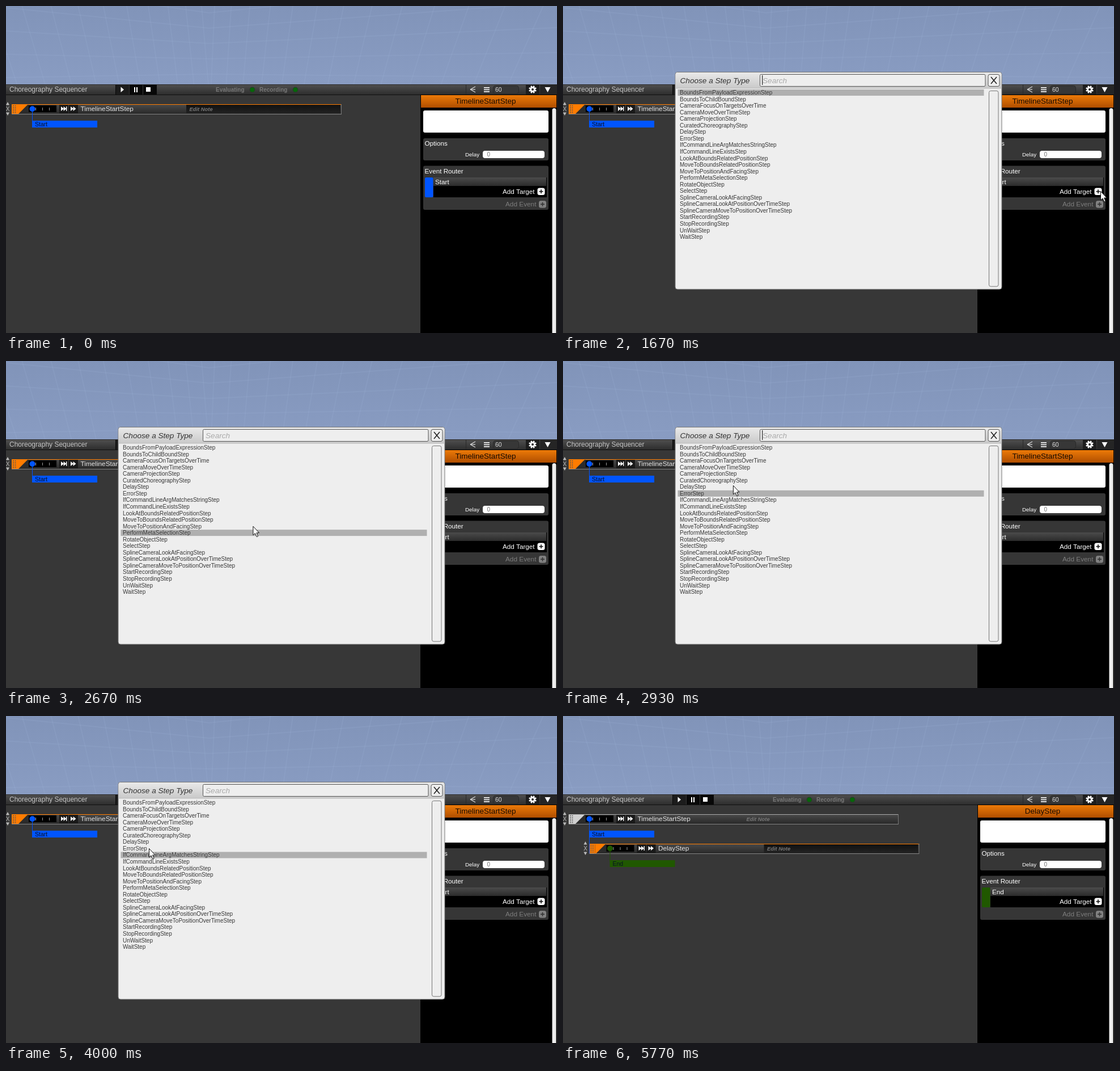
An HTML page with a canvas that plays this animation: 972x576 px, repeating every 7.46 s.

```html
<!DOCTYPE html>
<html lang="en">
<head>
<meta charset="utf-8">
<title>Choreography Sequencer</title>
<style>
html, body { margin: 0; width: 100%; height: 100%; overflow: hidden; background: #000; }
canvas { display: block; }
</style>
</head>
<body>
<canvas id="stage" width="972" height="576"></canvas>
<script>
const ctx = document.getElementById('stage').getContext('2d');
const LOOP = 7460, OPEN = 1670, CLOSE = 4470, BLINK = 295;
const ROW_TOP = 147, ROW_H = 11.55;
const ORANGE = '#ff7c00', BLUE = '#0055ff', GREEN = '#205800';

const steps = `BoundsFromPayloadExpressionStep BoundsToChildBoundStep CameraFocusOnTargetsOverTime
CameraMoveOverTimeStep CameraProjectionStep CuratedChoreographyStep DelayStep ErrorStep
IfCommandLineArgMatchesStringStep IfCommandLineExistsStep LookAtBoundsRelatedPositionStep
MoveToBoundsRelatedPositionStep MoveToPositionAndFacingStep PerformMetaSelectionStep
RotateObjectStep SelectStep SplineCameraLookAtFacingStep SplineCameraLookAtPositionOverTimeStep
SplineCameraMoveToPositionOverTimeStep StartRecordingStep StopRecordingStep UnWaitStep WaitStep`.split(/\s+/);

// Pointer path: time, x, y
const path = [
  [500, 801, 548], [700, 868, 440], [900, 926, 360], [1170, 948, 326],
  [2200, 948, 326], [2330, 850, 335], [2480, 650, 328], [2630, 477, 302], [2670, 436, 291],
  [2890, 311, 229], [2930, 300, 219], [3100, 284, 211], [3350, 268, 222], [3600, 258, 236],
  [3730, 258, 236], [3800, 256, 238], [3960, 256, 238], [4000, 252, 233], [4330, 256, 221],
  [5270, 256, 221], [5420, 238, 285], [5600, 262, 430], [5770, 301, 577]
];

function pointer(t) {
  const i = path.findIndex(p => p[0] > t);
  if (i < 1) return null;
  const [t0, x0, y0] = path[i - 1], [t1, x1, y1] = path[i];
  const k = (t - t0) / (t1 - t0);
  return { x: x0 + (x1 - x0) * k, y: y0 + (y1 - y0) * k };
}

function rect(x, y, w, h, fill) {
  ctx.fillStyle = fill;
  ctx.fillRect(x, y, w, h);
}
function round(x, y, w, h, r, fill, stroke) {
  ctx.beginPath();
  ctx.roundRect(x, y, w, h, r);
  ctx.fillStyle = fill;
  ctx.fill();
  if (stroke) { ctx.strokeStyle = stroke; ctx.lineWidth = 1; ctx.stroke(); }
}
function shade(y, h, top, bottom) {
  const g = ctx.createLinearGradient(0, y, 0, y + h);
  g.addColorStop(0, top);
  g.addColorStop(1, bottom);
  return g;
}
function text(s, x, y, size, fill, style = '', align = 'left') {
  ctx.font = `${style} ${size}px "Liberation Sans", Arial, sans-serif`;
  ctx.textAlign = align;
  ctx.fillStyle = fill;
  ctx.fillText(s, x, y);
}
function poly(fill, ...pts) {
  ctx.beginPath();
  for (let i = 0; i < pts.length; i += 2) ctx.lineTo(pts[i], pts[i + 1]);
  ctx.closePath();
  ctx.fillStyle = fill;
  ctx.fill();
}
function line(x0, y0, x1, y1, stroke, width = 1) {
  ctx.beginPath();
  ctx.moveTo(x0, y0);
  ctx.lineTo(x1, y1);
  ctx.strokeStyle = stroke;
  ctx.lineWidth = width;
  ctx.stroke();
}
function dot(x, y, r, fill) {
  ctx.beginPath();
  ctx.arc(x, y, r, 0, 7);
  ctx.fillStyle = fill;
  ctx.fill();
}

function sky() {
  rect(0, 0, 972, 138, shade(0, 138, '#8194b9', '#899cc2'));
  const light = 'rgba(165,182,215,.14)';
  for (let i = 0; i < 13; i++) {
    const d = 24 * i + i * i * 1.5;
    line(345 - d * 1.1, 0, 357 - d, 138, light, 2);
    line(368 + d * 1.15, 0, 362 + d * 1.04, 138, light, 2);
  }
  for (let i = 0; i < 6; i++) {
    const y = 12 + i * 27;
    line(358, y, 0, y - 50 + i * 14, light, 2);
    line(358, y, 972, y - 62 + i * 17, light, 2);
  }
}

function toolbar() {
  rect(0, 138, 972, 18, shade(138, 18, '#505050', '#2e2e2e'));
  rect(0, 138, 972, 1, '#282828');
  rect(0, 156, 972, 1, '#111');
  text('Choreography Sequencer', 6, 151, 12, '#c4c4c4');
  rect(193, 139, 73, 17, '#080808');
  rect(194, 139, 23, 17, '#1c1c1c');
  rect(217, 139, 1, 17, '#383838');
  rect(241, 139, 1, 17, '#383838');
  poly('#fff', 202.5, 142.5, 208, 147.2, 202.5, 152);
  rect(226, 143, 2, 9, '#fff');
  rect(230, 143, 2, 9, '#fff');
  rect(247, 143, 8, 8, '#fff');
  text('Evaluating', 370, 151, 10, '#787878', 'bold');
  text('Recording', 447, 151, 10, '#787878', 'bold');
  for (const x of [434.5, 510.5]) {
    dot(x, 147.5, 5, '#303530');
    dot(x, 147.5, 4, '#07660a');
  }
  for (const dy of [-5, 0, 5]) line(819, 147, 828, 147 + dy, '#ddd', 1.2);
  for (const y of [143, 146.5, 150]) rect(843, y, 10, 1.8, '#eee');
  rect(811, 139, 1, 17, '#292929');
  round(859.5, 140.5, 45, 14, 4, '#373737', '#292929');
  text('60', 863, 151, 10.5, '#ddd');
  rect(917, 139, 24, 17, '#1d1d1d');
  rect(942, 139, 30, 17, '#252525');
  for (let i = 0; i < 4; i++) {
    const a = i * Math.PI / 4 + .39, c = Math.cos(a) * 6.8, s = Math.sin(a) * 6.8;
    line(929 - c, 147 - s, 929 + c, 147 + s, '#fff', 2.6);
  }
  dot(929, 147, 5, '#fff');
  dot(929, 147, 2, '#222');
  poly('#fff', 950.5, 143, 960.5, 143, 955.5, 152);
}

function timelineRow(dx, dy, name, event, color, selected) {
  ctx.save();
  ctx.translate(dx, dy);
  poly('#bbb', 0, 174.5, 3, 169, 6, 174.5);
  poly('#bbb', 0, 187.5, 3, 193, 6, 187.5);
  text('X', 3, 185, 10, '#bbb', '', 'center');
  const accent = selected ? ORANGE : '#d0d0d0';
  rect(10, 173, 582, 17, shade(173, 17, '#4a4a4a', '#292929'));
  rect(10, 173, 10, 17, accent);
  for (let y = 175; y < 188; y += 3) {
    rect(12, y, 2, 1.3, '#555');
    rect(15.5, y, 2, 1.3, '#555');
  }
  rect(20, 173, 20, 17, '#2b2b2b');
  poly(accent, 20, 173, 39, 173, 22, 190, 20, 190);
  rect(40, 175, 49, 12, '#000');
  for (const x of [52, 64, 76]) rect(x, 179, 1, 5, '#999');
  rect(94, 174, 16, 15, '#191919');
  rect(111, 174, 16, 15, '#191919');
  for (const x of [97, 101.5, 114, 118.5]) poly('#fff', x, 177, x + 5, 181, x, 185);
  rect(106, 177, 1.4, 8, '#fff');
  text(name, 131.5, 185, 11.8, '#e5e5e5');
  if (selected) rect(318, 174, 272, 15, shade(174, 15, '#111', '#222'));
  text('Edit Note', 323.5, 184.5, 9.4, '#777', 'italic bold');
  rect(10, 173, 582, 1, selected ? ORANGE : '#aaa');
  rect(10, 190, 582, 1, '#858585');
  rect(591, 173, 1, 17, '#777');
  rect(46, 181, 1, 23, color);
  dot(46.5, 181.3, 5, color);
  rect(46, 202, 115, 12, color);
  text(event, 51, 212, 10.5, '#071026');
  ctx.restore();
}

function plus(x, y, fill, mark) {
  round(x, y - 6, 13, 12.5, 3.5, fill);
  rect(x + 3, y - .6, 7, 1.6, mark);
  rect(x + 5.7, y - 3.3, 1.6, 7, mark);
}

function inspector(name, event, color, pressed) {
  rect(731, 156, 241, 420, '#000');
  rect(732, 157, 239, 22, shade(157, 22, '#ec7a08', '#b04e00'));
  text(name, 846, 172, 13.5, '#170a00', '', 'center');
  round(963.5, 180, 7, 400, 3.5, '#eee');
  round(736, 184, 221, 39, 3, '#fff');
  round(736, 233, 221, 39, 3, '#363636');
  text('Options', 738.5, 246, 11.7, '#fff');
  text('Delay', 810, 265, 9.8, '#fff');
  round(841, 255, 109, 13, 4, '#fff');
  text('0', 848.5, 265, 10, '#777');
  round(736, 281.5, 221, 77.5, 3, '#363636');
  text('Event Router', 738.5, 295, 11.7, '#fff');
  rect(754, 302, 200, 35, '#000');
  rect(754, 302, 199, 15, shade(302, 15, '#4b4b4b', '#2b2b2b'));
  round(739, 302, 14.5, 35, 2, color);
  text(event, 757, 313.5, 11.7, '#fff');
  text('Add Target', 876, 330.5, 11.7, '#fff');
  plus(937.5, 326.5, pressed ? '#bbb' : '#fff', '#111');
  text('Add Event', 881, 353, 11.8, '#7d7d7d');
  plus(940, 349, '#818181', '#333');
}

function hoverRow(t) {
  const p = pointer(t - 40); // the highlight trails the pointer slightly
  if (!p || p.x > 743) return 0;
  return Math.floor((p.y + 4 - ROW_TOP) / ROW_H);
}

function dialog(t) {
  round(198, 116.5, 576, 382.5, 4, '#eee', '#777');
  round(198.5, 117, 575, 28, [4, 4, 0, 0], shade(117, 28, '#e9e9e9', '#c9c9c9'));
  rect(198.5, 144.5, 575, 1, '#bcbcbc');
  text('Choose a Step Type', 206.5, 135.5, 13.6, '#333', 'italic');
  round(347.5, 120.5, 397.5, 21, 2, '#eee', '#555');
  text('Search', 352, 135.5, 13.6, '#aaa', 'italic');
  if (Math.floor((t - OPEN) / BLINK) % 2 === 0) rect(351, 122, 1.3, 17, '#333');
  round(750, 120.5, 20, 21, 3, '#eee', '#555');
  line(755, 125, 765, 137, '#222', 1.6);
  line(765, 125, 755, 137, '#222', 1.6);
  round(751.5, 149.5, 16.5, 344.5, 3, '#eee', '#777');
  rect(202.5, ROW_TOP + hoverRow(t) * ROW_H, 540, 11, '#b0b0b0');
  steps.forEach((s, i) => text(s, 206, 156 + i * ROW_H, 10, '#383838'));
}

function arrow({ x, y }) {
  ctx.save();
  ctx.translate(x, y);
  poly('#fff', .5, .5, .5, 16, 4, 12.8, 6.8, 19, 9.2, 18, 6.6, 12, 11.2, 12);
  ctx.strokeStyle = '#111';
  ctx.lineWidth = 1;
  ctx.stroke();
  ctx.restore();
}

function draw(t) {
  const added = t >= CLOSE;
  sky();
  toolbar();
  rect(0, 157, 731, 419, '#373737');
  timelineRow(0, 0, 'TimelineStartStep', 'Start', BLUE, !added);
  if (added) {
    timelineRow(36.5, 52, 'DelayStep', 'End', GREEN, true);
    rect(46, 214, 1, 28, BLUE);
    inspector('DelayStep', 'End', GREEN);
  } else {
    inspector('TimelineStartStep', 'Start', BLUE, t >= 1530 && t < OPEN);
  }
  if (t >= OPEN && !added) dialog(t);
  const p = pointer(t);
  if (p) arrow(p);
}

const start = performance.now();
function tick() {
  draw(Math.max(0, performance.now() - start) % LOOP);
  requestAnimationFrame(tick);
}
tick();
</script>
</body>
</html>
```
